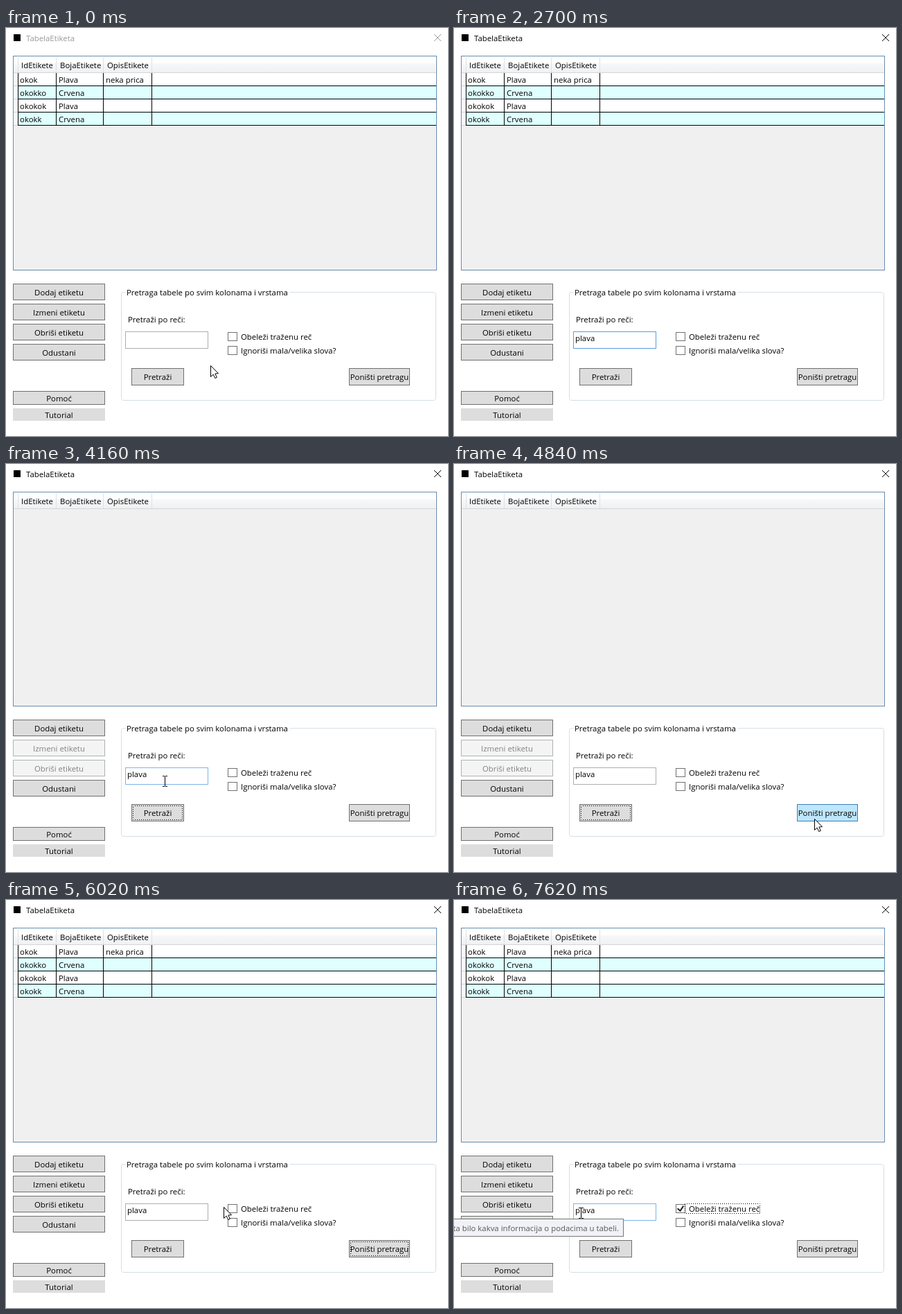
Write an HTML page with a canvas that moves like this. It is 638 px wide and 589 px high and loops after 8 s.

```html
<!DOCTYPE html>
<html lang="sr">
<head>
<meta charset="utf-8">
<title>TabelaEtiketa</title>
<style>
html, body { margin: 0; width: 100%; height: 100%; overflow: hidden; background: #fff; }
canvas { display: block; }
</style>
</head>
<body>
<canvas id="stage" width="638" height="589"></canvas>
<script>
const ctx = document.getElementById('stage').getContext('2d');
const LOOP = 8000;
const STEP = 77;
const FONT = '11.4px "Open Sans", "Noto Sans", sans-serif';

const at = {
  activate: 1210, type: 1430, caretOff: 2700,
  searchDown: 3150, searchUp: 3230,
  resetDown: 5140, resetUp: 5300,
  markDown: 6330, markUp: 6390
};

// Pointer glides: start, end, destination
const glides = [
  { from: 730, to: 1290, x: 255, y: 455 },
  { from: 2760, to: 3070, x: 233, y: 493 },
  { from: 3390, to: 3390, x: 231, y: 484 },
  { from: 3770, to: 4000, x: 229, y: 458 },
  { from: 4200, to: 4540, x: 327, y: 451 },
  { from: 4760, to: 4840, x: 520, y: 512 },
  { from: 4910, to: 5060, x: 539, y: 506 },
  { from: 5310, to: 5540, x: 330, y: 446 },
  { from: 5780, to: 5780, x: 288, y: 446 },
  { from: 5860, to: 6168, x: 331, y: 441 },
  { from: 6870, to: 7250, x: 183, y: 452 }
];

const input = { x: 172, y: 438, w: 120, h: 25 };
const search = { x: 181, y: 491, w: 76, h: 25 };
const reset = { x: 495, y: 491, w: 88, h: 25 };
const markBox = { x: 320, y: 439, w: 122, h: 13 };
const caseBox = { x: 320, y: 459, w: 158, h: 13 };

const between = (t, a, b) => t >= a && t < b;
const clamp = v => Math.max(0, Math.min(1, v));
const inside = (p, r) => p && p.x >= r.x && p.x < r.x + r.w && p.y >= r.y && p.y < r.y + r.h;

// Moves in whole screen refreshes; hidden while typing
function pointerAt(t) {
  if (between(t, at.type, 2760)) return null;
  const p = { x: 295, y: 487 };
  for (const { from, to, x, y } of glides) {
    if (t < from) break;
    const steps = Math.round((to - from) / STEP) + 1;
    const u = clamp((Math.floor((t - from) / STEP) + 1) / steps);
    p.x += Math.round((x - p.x) * u);
    p.y += Math.round((y - p.y) * u);
  }
  return p;
}

function fill(x, y, w, h, color) {
  ctx.fillStyle = color;
  ctx.fillRect(x, y, w, h);
}

function frame(x, y, w, h, color) {
  ctx.strokeStyle = color;
  ctx.lineWidth = 1;
  ctx.strokeRect(x + 0.5, y + 0.5, w - 1, h - 1);
}

function focusRect(x, y, w, h) {
  ctx.setLineDash([1, 2]);
  ctx.lineDashOffset = 0.5;
  frame(x, y, w, h, '#000');
  ctx.setLineDash([]);
}

function text(s, x, y, color = '#000', align = 'left') {
  ctx.fillStyle = color;
  ctx.textAlign = align;
  ctx.fillText(s, x, y);
}

function poly(points, close) {
  ctx.beginPath();
  for (const [x, y] of points) ctx.lineTo(x, y);
  if (close) ctx.closePath();
}

const looks = {
  normal: ['#dddddd', '#707070', '#000'],
  hover: ['#bee6fd', '#3c7fb1', '#000'],
  pressed: ['#c4e5f6', '#2c628b', '#000'],
  disabled: ['#f4f4f4', '#adb2b5', '#838383'],
  flat: ['#dddddd', '#dddddd', '#000']
};

function button(label, { x, y, w, h }, look = 'normal', focused = false) {
  const [back, edge, ink] = looks[look];
  fill(x, y, w, h, back);
  frame(x, y, w, h, edge);
  text(label, x + w / 2, Math.floor(y + h / 2 + 5), ink, 'center');
  if (focused) focusRect(x + 2, y + 2, w - 4, h - 4);
}

function checkBox(label, { x, y, h }, { hover, pressed, checked, focused }) {
  fill(x, y, 14, h, pressed ? '#d9ecff' : hover ? '#f3f9ff' : '#fff');
  frame(x, y, 14, h, pressed ? '#3c77dd' : hover ? '#5593ff' : '#707070');
  if (checked) {
    ctx.strokeStyle = '#212121';
    ctx.lineWidth = 2;
    poly([[x + 2.6, y + 6.3], [x + 6.5, y + 9.7], [x + 11.2, y + 2.6]]);
    ctx.stroke();
  }
  text(label, x + 19, y + 11);
  if (focused) focusRect(x + 13, y - 1, 109, 15);
}

function titleBar(active) {
  const ink = active ? '#000' : '#999';
  fill(11, 9, 10, 10, '#000');
  text('TabelaEtiketa', 29, 19, ink);
  ctx.strokeStyle = ink;
  ctx.lineWidth = 1;
  poly([[618, 9], [628, 19]]);
  ctx.stroke();
  poly([[628, 9], [618, 19]]);
  ctx.stroke();
}

const lines = [17, 72, 140, 210];
const columns = [20, 76, 144];
const heads = ['IdEtikete', 'BojaEtikete', 'OpisEtikete'];
const rows = [['okok', 'Plava', 'neka prica'], ['okokko', 'Crvena'], ['okokok', 'Plava'], ['okokk', 'Crvena']];

function table(full) {
  fill(10, 40, 612, 310, '#f0f0f0');
  const shade = ctx.createLinearGradient(0, 41, 0, 64);
  shade.addColorStop(0, '#fff');
  shade.addColorStop(0.42, '#fff');
  shade.addColorStop(0.43, '#f7f8f9');
  shade.addColorStop(1, '#f0f1f3');
  fill(11, 41, 610, 23, shade);
  fill(11, 64, 610, 1, '#d5d5d5');
  for (const x of lines) fill(x, 42, 1, 22, '#dfe1e4');
  heads.forEach((s, i) => text(s, columns[i] + 2, 58));

  if (full) rows.forEach((cells, i) => {
    const y = 65 + i * 19;
    fill(11, y, 6, 18, '#f9fafb');
    fill(11, y + 18, 6, 1, '#d5d5d5');
    fill(17, y, 604, 18, i % 2 ? '#e0ffff' : '#fff');
    fill(17, y + 18, 604, 1, '#000');
    for (const x of lines) fill(x, y, 1, 19, '#000');
    cells.forEach((s, c) => text(s, columns[c], y + 14));
  });
  frame(10, 40, 612, 310, '#688caf');
}

function groupBox() {
  ctx.strokeStyle = '#d5dfe5';
  ctx.lineWidth = 1;
  ctx.beginPath();
  ctx.roundRect(166.5, 381.5, 454, 156, 3);
  ctx.stroke();
  fill(172, 380, 238, 4, '#fff');
  text('Pretraga tabele po svim kolonama i vrstama', 174, 386);
  text('Pretraži po reči:', 176, 425);
}

function textBox(t, focused, hover) {
  const { x, y, w, h } = input;
  const word = 'plava'.slice(0, Math.max(0, Math.floor((t - at.type) / 160) + 1));
  fill(x, y, w, h, '#fff');
  frame(x, y, w, h, focused ? '#569de5' : hover ? '#7eb4ea' : '#abadb3');
  text(word, 175, 452);
  if (between(t, at.activate, at.caretOff)) {
    fill(Math.round(175 + ctx.measureText(word).width), 440, 1, 15, '#000');
  }
}

function tooltip(s, right, y, alpha) {
  ctx.globalAlpha = alpha;
  fill(-10, y, right + 10, 26, '#f1f2f7');
  frame(-10, y, right + 10, 26, '#767676');
  text(s, right - 7, y + 18, '#575757', 'right');
  ctx.globalAlpha = 1;
}

function pointer(p) {
  if (!p) return;
  const { x, y } = p;
  if (inside(p, input)) {
    fill(x, y - 7, 1, 14, '#000');
    for (const edge of [y - 8, y + 7]) {
      fill(x - 3, edge, 3, 1, '#000');
      fill(x + 1, edge, 3, 1, '#000');
    }
    return;
  }
  ctx.save();
  ctx.translate(x + 0.5, y + 0.5);
  poly([[0, 0], [0, 16], [3.6, 12.6], [6.2, 18], [8.8, 17], [6.4, 11.5], [11, 11.2]], true);
  ctx.fillStyle = '#fff';
  ctx.fill();
  ctx.strokeStyle = '#000';
  ctx.lineWidth = 1;
  ctx.stroke();
  ctx.restore();
}

function draw(t) {
  const p = pointerAt(t);
  const full = !between(t, at.searchUp, at.resetUp);
  const look = (box, down, up) => between(t, down, up) ? 'pressed' : inside(p, box) ? 'hover' : 'normal';

  fill(0, 0, 638, 589, '#fff');
  ctx.font = FONT;
  titleBar(t >= at.activate);
  table(full);

  const edit = full ? 'normal' : 'disabled';
  const menu = [['Dodaj etiketu'], ['Izmeni etiketu', edit], ['Obriši etiketu', edit], ['Odustani']];
  menu.forEach(([label, state], i) => button(label, { x: 10, y: 369 + i * 29, w: 133, h: 24 }, state));
  button('Pomoć', { x: 10, y: 524, w: 133, h: 20 });
  button('Tutorial', { x: 10, y: 549, w: 133, h: 18 }, 'flat');

  groupBox();
  textBox(t, between(t, at.activate, at.searchDown), inside(p, input));
  checkBox('Obeleži traženu reč', markBox, {
    hover: inside(p, markBox),
    pressed: between(t, at.markDown, at.markUp),
    checked: t >= at.markUp,
    focused: t >= at.markDown
  });
  checkBox('Ignoriši mala/velika slova?', caseBox, { hover: inside(p, caseBox) });
  button('Pretraži', search, look(search, at.searchDown, at.searchUp), between(t, at.searchDown, at.resetDown));
  button('Poništi pretragu', reset, look(reset, at.resetDown, at.resetUp), between(t, at.resetDown, at.markDown));

  tooltip('Poništavate rezultate pretrage i vraća se tabela onako kako je inicijalno izgledala pre vršenja pretrage.',
    508, 533, clamp(1 - Math.abs(t - 5120) / 125));
  tooltip('Unesite reč da bi se pronašla ta bilo kakva informacija o podacima u tabeli.',
    245, 460, clamp((t - 7500) / 120));
  pointer(p);
}

function tick() {
  draw(performance.now() % LOOP);
  requestAnimationFrame(tick);
}
tick();
</script>
</body>
</html>
```
